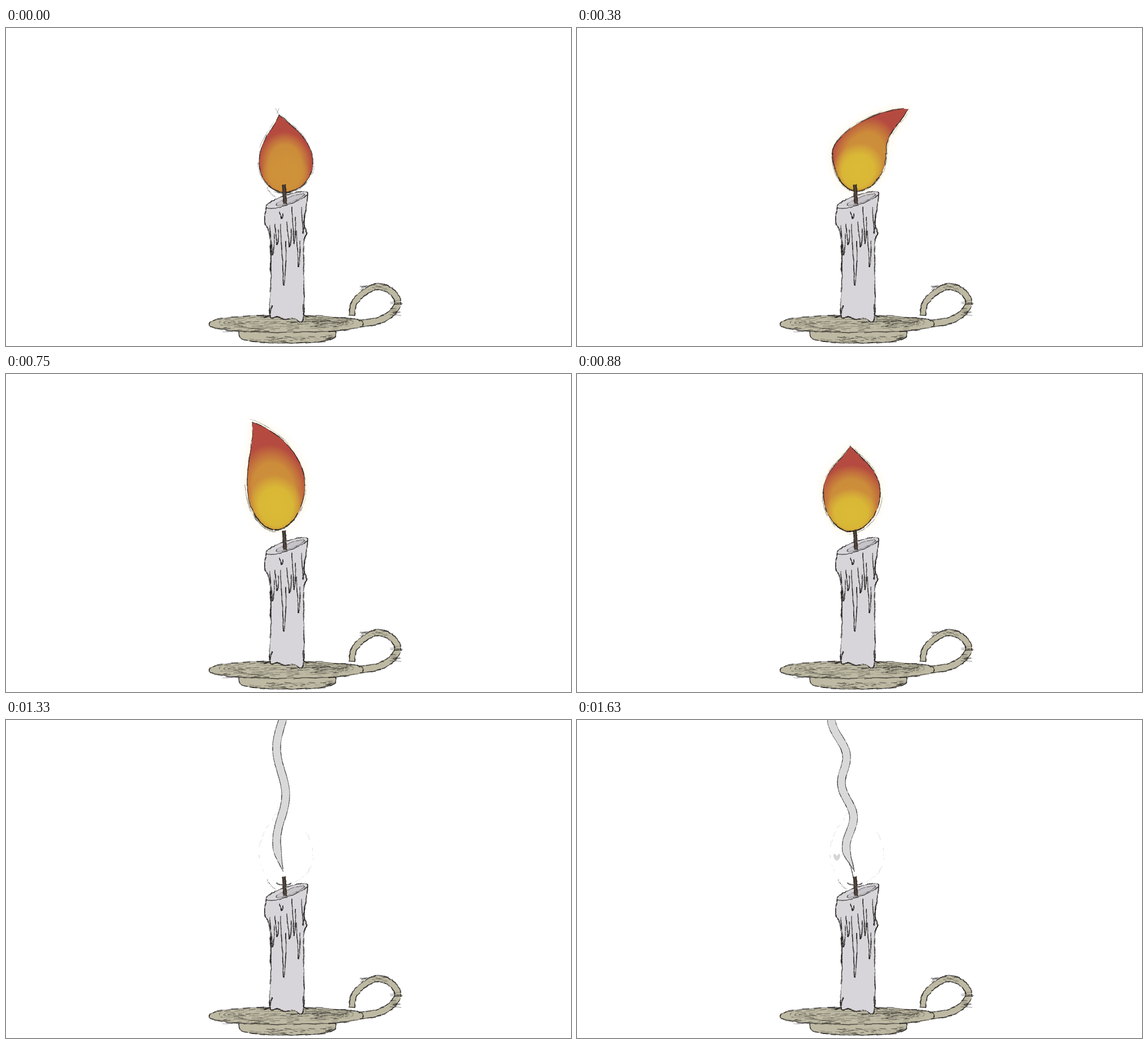
Recreate the animation shown at these times as an HTML page with a canvas. Size 998 by 561 pixels, loop 1680 ms.

```html
<!DOCTYPE html>
<html lang="en">
<head>
<meta charset="utf-8">
<title>Candle</title>
<style>
  html, body { margin: 0; width: 100%; height: 100%; overflow: hidden; background: #fff; }
  canvas { display: block; width: 100vw; height: 100vh; }
</style>
</head>
<body>
<canvas id="stage" width="998" height="561"></canvas>
<script>
const W = 998, H = 561, LOOP = 1680, STEP = 125 / 3, LAST = 39, TAU = Math.PI * 2;
const RED = '#b54a40', INK = '#211e1c', WAX = '#d8d5da', CLAY = '#bdb9a3';
const GOLD = [206, 146, 58], YELLOW = [218, 187, 54];
const screenCtx = document.getElementById('stage').getContext('2d');
let ctx = screenCtx, seed = 1;

function rand() {
  seed = (seed * 16807) % 2147483647;
  return seed / 2147483647;
}
const jitter = a => (rand() - 0.5) * 2 * a;
const lerp = (a, b, k) => a + (b - a) * k;
const mix = (a, b, k) => a.map((v, i) => lerp(v, b[i], k));
const clamp = v => Math.min(1, Math.max(0, v));
const range = n => Array.from({ length: n }, (_, i) => i);

// Catmull-Rom spline through points written as "x,y x,y ..."
function curve(text, n = 8) {
  const p = text.trim().split(/\s+/).map(s => s.split(',').map(Number)), end = p.length - 1;
  return range(end * n + 1).map(s => {
    const i = Math.min(Math.floor(s / n), end - 1), t = s / n - i;
    const a = p[Math.max(i - 1, 0)], b = p[i], c = p[i + 1], d = p[Math.min(i + 2, end)];
    return [0, 1].map(k => b[k] + 0.5 * t * (c[k] - a[k] +
      t * (2 * a[k] - 5 * b[k] + 4 * c[k] - d[k] + t * (3 * (b[k] - c[k]) + d[k] - a[k]))));
  });
}

function bezier(a, b, c, d, n = 16) {
  return range(n + 1).map(i => {
    const t = i / n, u = 1 - t;
    return [0, 1].map(k => u * u * u * a[k] + 3 * u * t * (u * b[k] + t * c[k]) + t * t * t * d[k]);
  });
}

// Ellipse: power < 1 makes it boxy, > 1 gives pointed ends; tilt shears it
function oval(cx, cy, rx, ry, power = 1, tilt = 0, n = 64) {
  return range(n + 1).map(i => {
    const c = Math.cos(i / n * TAU), s = Math.sin(i / n * TAU);
    return [cx + rx * c, cy + ry * Math.sign(s) * Math.abs(s) ** power + tilt * c];
  });
}

// Both edges of a band along a spine
function ribbon(spine, half) {
  const left = [], right = [];
  spine.forEach(([x, y], i) => {
    const a = spine[Math.max(i - 1, 0)], b = spine[Math.min(i + 1, spine.length - 1)];
    const len = Math.hypot(b[0] - a[0], b[1] - a[1]) || 1, w = half(i / (spine.length - 1));
    const nx = (a[1] - b[1]) / len * w, ny = (b[0] - a[0]) / len * w;
    left.push([x + nx, y + ny]);
    right.push([x - nx, y - ny]);
  });
  return [...left, ...right.reverse()];
}

function trace(pts) {
  ctx.beginPath();
  pts.forEach(([x, y]) => ctx.lineTo(x, y));
}

function fill(pts, color) {
  trace(pts);
  ctx.fillStyle = color;
  ctx.fill();
}

function dash(x0, y0, x1, y1, width, alpha) {
  ctx.strokeStyle = INK;
  ctx.lineCap = 'round';
  ctx.lineWidth = width;
  ctx.globalAlpha = alpha;
  trace([[x0, y0], [x1, y1]]);
  ctx.stroke();
  ctx.globalAlpha = 1;
}

// Uneven pencil line, drawn twice with breaks
function pencil(pts, width = 1.4, alpha = 0.8, rough = 0.7, gap = 0.12) {
  for (let pass = 0; pass < 2; pass++) {
    let [px, py] = pts[0];
    for (const p of pts.slice(1)) {
      const x = p[0] + jitter(rough), y = p[1] + jitter(rough);
      if (rand() >= gap) dash(px, py, x, y, width * (0.4 + 0.9 * rand()), alpha * (0.5 + 0.5 * rand()));
      px = x;
      py = y;
    }
  }
}

function shape(pts, color, ...style) {
  fill(pts, color);
  pencil([...pts, pts[0]], ...style);
}

function hatch(cx, cy, rx, ry, n) {
  for (let i = 0; i < n; i++) {
    const x = cx + jitter(rx), y = cy + jitter(ry), len = 3 + 8 * rand();
    dash(x, y, x + len, y + jitter(1.5), 0.6 + rand(), 0.6 * rand());
  }
}

function drawHolder() {
  shape(oval(497, 537, 86, 19, 0.5), CLAY);
  hatch(493, 549, 68, 5, 55);
  hatch(566, 546, 7, 5, 20);
  const handle = curve('611,507 615,485 634,466 657,456 681,465 692,484 680,504 655,517 612,523');
  shape(ribbon(handle, t => 5 + t), CLAY, 1.5);
  hatch(684, 494, 6, 14, 35);
  hatch(650, 458, 28, 4, 25);
  shape(oval(495, 522, 136, 15, 0.75), CLAY, 1.5, 0.8, 1, 0.2);
  for (let i = 0; i < 3; i++) pencil(oval(495, 520, 118 - i * 8, 10 - i * 4, 0.7), 1, 0.5, 1, 0.45);
  hatch(420, 533, 40, 4, 45);
  hatch(565, 516, 38, 5, 75);
  hatch(490, 526, 110, 8, 70);
}

// Wax run: a narrow neck that swells into a rounded end
function drip(x, y, w, len) {
  pencil(range(25).map(i => {
    const t = i / 24 * 1.6, down = Math.sin(Math.min(t, 1) * Math.PI / 2);
    const back = Math.max(0, t - 1), side = t < 1 ? -1 : 1;
    const swell = Math.sqrt(Math.abs(1 - t)) * (0.7 + 0.3 * Math.cos(t * 5));
    return [x + side * swell * w, y + len * (down - back * 1.2)];
  }), 1.4, 0.85, 0.5, 0.05);
}

function drawCandle() {
  shape(curve(`460,316 457,342 466,367 468,440 466,506 480,509 492,514 508,512 525,514
    526,440 526,378 531,362 526,343 530,318 533,293`, 12), WAX, 1.6);
  shape(oval(496, 303.5, 37, 9, 1, -12), WAX, 1.2, 0.75);
  shape(oval(502, 303, 25, 5, 1, -9), '#c6c4c9', 0.9, 0.45);
  drip(487, 324, 4, 12);
  drip(491, 346, 6, 108);
  drip(501, 342, 5, 44);
  drip(509, 316, 4, 64);
  drip(517, 358, 4, 63);
  drip(525, 316, 3, 46);
  drip(471, 348, 5, 52);
  drip(479, 346, 4, 36);
  pencil(curve('467,384 468,405 467,430'), 2);
  pencil(curve('470,490 465,506 456,511'), 1.8);
  pencil(curve('525,488 526,506 534,509'), 1.6);
}

function drawWick() {
  shape(ribbon(curve('491,277 492,294 493,310', 6), () => 2.6), '#54443a', 1.4);
}

// Key poses: frame, tip x/y, base x/y, left and right edge, height of the belly
const poses = [
  [0, 482, 153, 492, 290, 447, 542, 239],
  [9, 585, 143, 494, 288, 451, 546, 222],
  [13, 494, 76, 486, 285, 440, 554, 178],
  [18, 435, 85, 476, 275, 426, 528, 196],
  [20, 405, 104, 477, 276, 418, 526, 202],
  [22, 560, 150, 488, 280, 452, 545, 218],
  [24, 670, 250, 540, 278, 497, 590, 254]
];

function poseAt(n) {
  const i = Math.max(1, poses.findIndex(p => p[0] >= n)), a = poses[i - 1], b = poses[i];
  const u = (n - a[0]) / (b[0] - a[0]);
  return mix(a, b, u * u * (3 - 2 * u));
}

// Tip, right side, base, left side and back; the tip curls the way it leans
function flameOutline([, tx, ty, bx, by, left, right, belly]) {
  const lean = tx - (left + right) / 2, angle = (85 + lean * 0.8) * Math.PI / 180;
  const reach = 0.36 * Math.hypot(lean, belly - ty);
  const handle = da => [tx + reach * Math.cos(angle + da), ty + reach * Math.sin(angle + da)];
  const up = lerp(belly, ty, 0.5), low = lerp(belly, by, 0.55);
  const tip = [tx, ty], base = [bx, by];
  return [
    ...bezier(tip, handle(-0.6), [right, up], [right, belly]),
    ...bezier([right, belly], [right, low], [lerp(bx, right, 0.5), by], base),
    ...bezier(base, [lerp(bx, left, 0.5), by], [left, low], [left, belly]),
    ...bezier([left, belly], [left, up], handle(0.6), tip)
  ];
}

function drawCore(x, y, rx, ry, turn, color) {
  const g = ctx.createRadialGradient(0, 0, 0, 0, 0, 1), c = color.map(Math.round).join();
  g.addColorStop(0, `rgba(${c},1)`);
  g.addColorStop(0.6, `rgba(${c},.92)`);
  g.addColorStop(0.8, `rgba(${c},.5)`);
  g.addColorStop(1, `rgba(${c},0)`);
  ctx.save();
  ctx.translate(x, y);
  ctx.rotate(turn);
  ctx.scale(rx, ry);
  ctx.fillStyle = g;
  ctx.fillRect(-1, -1, 2, 2);
  ctx.restore();
}

function drawFire(outline, glow, cores) {
  ctx.save();
  ctx.shadowColor = `rgba(255,215,110,${glow})`;
  ctx.shadowBlur = 16;
  fill(outline, RED);
  ctx.restore();
  ctx.save();
  trace(outline);
  ctx.clip();
  cores();
  ctx.restore();
  pencil(outline, 1.2, 0.75, 0.8, 0.15);
}

// Loose strokes beside a line, pushed away from its middle
function strays(pts, cx, cy, count) {
  for (let i = 0; i < count; i++) {
    const start = Math.floor(rand() * (pts.length - 10)), push = 1 + 0.07 * rand(), slip = jitter(2);
    pencil(pts.slice(start, start + 10).map(([x, y]) =>
      [cx + (x - cx) * push + slip, cy + (y - cy) * push]), 0.6, 0.55, 0.8, 0.2);
  }
}

function drawFlame(n) {
  const pose = poseAt(n), pts = flameOutline(pose);
  const [, tx, ty, bx, by, left, right, belly] = pose;
  const width = right - left, mid = (left + right) / 2, len = Math.hypot(tx - bx, ty - by);
  const heat = clamp(n / 9), turn = (tx - mid) / 200;
  drawFire(pts, heat * 0.3, () => {
    drawCore(lerp(mid, tx, 0.1), by - len * 0.36, width * lerp(0.5, 0.6, heat), len * 0.42, turn, GOLD);
    drawCore(lerp(mid, bx, 0.4), by - len * 0.21, width * 0.48, len * 0.29, turn, mix(GOLD, YELLOW, heat));
  });
  pencil(pts.slice(24, 44), 1.8, 0.6, 1.2, 0.3);
  strays(pts, mid, belly, 9);
}

// Torn-off flames: x, y, half length, half height, tilt
const embers = [[642, 253, 46, 16, 8], [743, 237, 29, 6, 0], [789, 269, 24, 9, 1]];

function drawEmbers(n) {
  const age = n - 25, size = 1 - age * 0.07;
  for (const [x0, y, w, h, tilt] of embers) {
    const x = x0 + age * 88, pts = oval(x, y, w * size, h * size, 1.6, tilt, 32);
    drawFire(pts, 0.15, () => {
      drawCore(x, y, w * 0.85, h, tilt / w, GOLD);
      drawCore(x, y, w * 0.6, h * 0.75, tilt / w, YELLOW);
    });
    strays(pts, x, y, 3);
  }
}

// Half-erased outline left around the wick
function drawTraces(n) {
  seed = 77;
  pencil(oval(491, 287, 13, 4).slice(2, 31), 1.4, 0.5);
  pencil(curve('461,282 468,292 477,299'), 0.8, 0.5, 1.5, 0.4);
  if (n < 27) for (const side of [-3, 3]) dash(479 + side, 142, 480 - side / 2, 151, 0.7, 0.5);
  if (n > 24) pencil(flameOutline(poses[0]).slice(10), 0.7, n < 27 ? 0.3 : 0.2, 1.8, 0.6);
}

// Rising wave that tightens and drifts left as it goes
function drawSmoke(n) {
  const k = clamp((n - 32) / 7), top = Math.max(-12, 235 - (n - 27) * 56);
  const period = lerp(165, 110, k), peak = lerp(132, 170, k);
  const spine = range(61).map(i => {
    const y = lerp(267, top, i / 60), rise = (267 - y) / 267;
    return [lerp(486, 484, k) - 27 * k * rise * rise + 8 * Math.cos((y - peak) / period * TAU), y];
  });
  const half = t => 7 * clamp(t * 8) * (top > 0 ? clamp((1 - t) * 5) : 1);
  shape(ribbon(spine, half), '#d9d9da', 1, 0.7, 0.3, 0.06);
  if (n > 35) {
    pencil(curve('480,250 485,264 488,278'), 0.9, 0.7, 0.3);
    for (const side of [-1, 1]) fill(oval(459 + side * 2.5, 242, 3.5, 5, 1, side * -3), '#d6d6d8');
  }
}

function layer(draw, start) {
  const c = document.createElement('canvas');
  c.width = W;
  c.height = H;
  ctx = c.getContext('2d');
  seed = start;
  draw();
  ctx = screenCtx;
  return c;
}
const candle = layer(() => { drawHolder(); drawCandle(); }, 4242);
const wick = layer(drawWick, 99);

function drawFrame(n) {
  ctx.fillStyle = '#fff';
  ctx.fillRect(0, 0, W, H);
  ctx.drawImage(candle, 0, 0);
  if (n < 4 || n > 24) drawTraces(n);
  seed = 1000 + n * 7919;
  if (n < 25) drawFlame(n);
  else if (n < 28) drawEmbers(n);
  if (n > 26) drawSmoke(n);
  ctx.drawImage(wick, 0, 0);
}

let shown = -1;
const begin = performance.now();
function tick() {
  const t = (performance.now() - begin) % LOOP;
  const n = Math.min(LAST, Math.floor((t + 4.9) / STEP));
  if (n !== shown) drawFrame(shown = n);
  requestAnimationFrame(tick);
}
tick();
</script>
</body>
</html>
```
